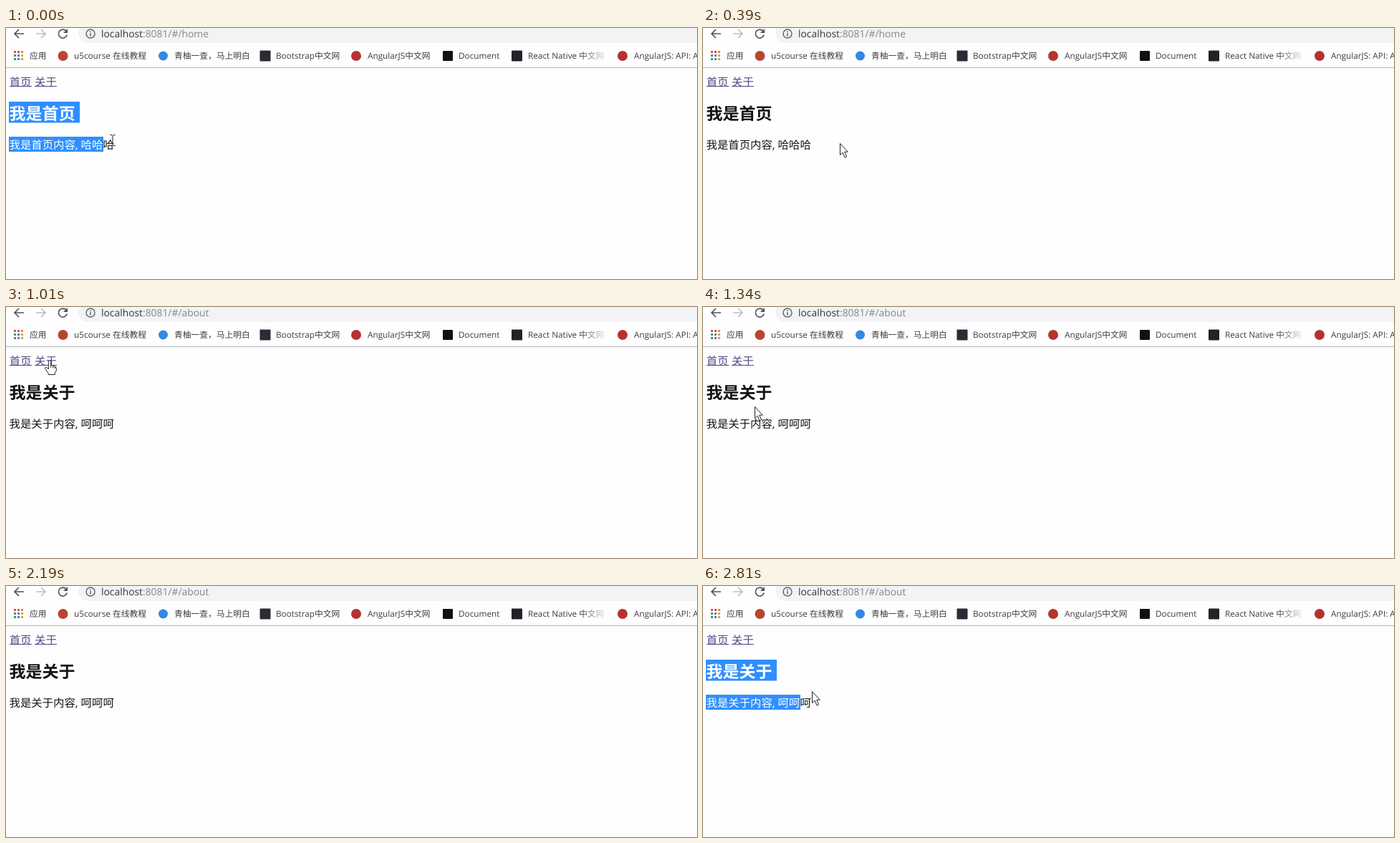
Write an HTML page that moves like this. It is 965 px wide and 351 px high and loops after 2.89 s.

```html
<!DOCTYPE html>
<html lang="zh-CN">
<head>
<meta charset="utf-8">
<title>Router demo</title>
<style>
  html, body { margin: 0; width: 100%; height: 100%; overflow: hidden; background: #fefefe; }
  svg { display: block; }
  text { font-family: "Open Sans", "Noto Sans CJK SC", sans-serif; text-rendering: geometricPrecision; }
  .url { font-size: 13.85px; fill: #84888c; }
  .marks text { font-size: 11.75px; fill: #3c3c40; }
  .link { font-size: 15.4px; fill: #504a86; }
  .title { font-size: 23px; font-weight: 700; }
  .body { font-size: 15.4px; }
  .cursor { display: none; }
</style>
</head>
<body>
<svg width="965" height="351" viewBox="0 0 965 351">
  <defs>
    <linearGradient id="fade" gradientUnits="userSpaceOnUse" x1="802" x2="838" y1="0" y2="0">
      <stop stop-color="#3c3c40"/>
      <stop offset="1" stop-color="#3c3c40" stop-opacity=".1"/>
    </linearGradient>
    <clipPath id="sel">
      <rect id="selTitle" x="4" y="103" height="29.5"/>
      <rect id="selBody" x="4" y="152" height="21"/>
    </clipPath>
  </defs>
  <rect width="965" height="351" fill="#fefefe"/>

  <!-- toolbar -->
  <rect x="101" y="-7" width="900" height="28" rx="14" fill="#f1f3f4"/>
  <g fill="none" stroke-width="1.7">
    <path d="M25 8H12.500M18 2L12 8L18 14" stroke="#505357"/>
    <path d="M42 8H54.500M49 2L55 8L49 14" stroke="#bcbec1"/>
    <path d="M84 4.200A6 6 0 1 0 85.200 9.500" stroke="#505357"/>
    <circle cx="118" cy="8" r="6" stroke="#5f6368" stroke-width="1.4"/>
    <path d="M118 7V11.500M118 4.500V6" stroke="#5f6368" stroke-width="1.5"/>
  </g>
  <path d="M86 1V7H80Z" fill="#505357"/>
  <text class="url" x="133" y="13"><tspan fill="#36393d">localhost</tspan>:8081/#/<tspan id="route"></tspan></text>

  <!-- bookmarks -->
  <g class="marks" id="marks"></g>
  <rect y="55" width="965" height="1" fill="#b4b4b6"/>

  <!-- page -->
  <text class="link" x="4.700" y="80.500">首页</text>
  <text class="link" x="40" y="80.500">关于</text>
  <path d="M5 81.500H36M40 81.500H71" stroke="#504a86"/>
  <g fill="#141414">
    <text class="title" x="4.500" y="128.200"></text>
    <text class="body" x="4.500" y="168.500"></text>
  </g>
  <g clip-path="url(#sel)" fill="#fff">
    <rect y="100" width="200" height="80" fill="#2f8fff"/>
    <text class="title" x="4.500" y="128.200"></text>
    <text class="body" x="4.500" y="168.500"></text>
  </g>

  <!-- pointers, each with its hot spot at 0,0 -->
  <path class="cursor" id="arrow" d="M.5.5V16.500L4.200 13.200L7 20L9.600 18.900L6.800 12.200H11.300Z" fill="#fff" stroke="#222"/>
  <path class="cursor" id="beam" d="M-3.500-7.500H-1L0-6.500L1-7.500H3.500M0-6.500V6.500M-3.500 7.500H-1L0 6.500L1 7.500H3.500" fill="none" stroke="#222"/>
  <g class="cursor" id="hand" stroke="#222" stroke-linejoin="round">
    <path d="M-1.700 12V1.200Q-1.500-.5 0-.5T1.700 1.200V6.500Q4.500 5.700 4.800 7.500Q7.200 7 7.400 8.700Q9.300 8.500 9.300 10.500V14L7.300 17V19.500H-2V17.500L-6.500 10.800Q-6.500 8.600-4.300 9.200Z" fill="#fff"/>
    <path d="M1.700 6.500V10M4.800 7.500V10.500M7.400 8.700V11" fill="none"/>
  </g>
</svg>
<script>
const LOOP = 2890;
const $ = id => document.getElementById(id);
const all = css => [...document.querySelectorAll(css)];

const pages = {
  home: ['我是首页', '我是首页内容, 哈哈哈'],
  about: ['我是关于', '我是关于内容, 呵呵呵']
};

// time, pointer, x, y, selected width of title, of body
const steps = [
  [0, 'beam', 149, 157, 99, 132],
  [70, 'beam', 149, 157, 99, 147],
  [250, 'arrow', 176, 183, 99, 147],
  [320, 'arrow', 190, 168],
  [390, 'arrow', 191, 161],
  [490, 'arrow', 152, 131],
  [570, 'arrow', 84, 88],
  [640, 'hand', 61, 75],
  [1020, 'hand', 60, 74],
  [1100, 'arrow', 62, 88],
  [1180, 'arrow', 66, 110],
  [1260, 'arrow', 70, 130],
  [1340, 'arrow', 72, 139],
  [1480, 'arrow', 70, 138],
  [1560, 'arrow', 58, 134],
  [1640, 'beam', 36, 124],
  [1720, 'none', 8, 118],
  [2100, 'beam', 9, 118],
  [2180, 'beam', 20, 120],
  [2260, 'beam', 42, 121],
  [2420, 'beam', 31, 122],
  [2570, 'beam', 30, 123],
  [2650, 'beam', 66, 122, 62],
  [2730, 'beam', 112, 150, 99, 101],
  [2810, 'arrow', 152, 147, 99, 132]
];
const ROUTE_CHANGE = 940;

// kind, icon centre, size, colour, label x, label
const bookmarks = [
  ['apps', 17.5, 0, '', 33, '应用'],
  ['dot', 79.5, 14, '#b8452f', 95, 'u5course 在线教程'],
  ['dot', 219.5, 13, '#3388e0', 235, '青柚一查，马上明白'],
  ['box', 362, 15, '#2c2a35', 377, 'Bootstrap中文网'],
  ['dot', 489, 14, '#b5322f', 505, 'AngularJS中文网'],
  ['box', 617, 14, '#111', 632, 'Document'],
  ['box', 713.5, 15, '#202328', 729, 'React Native 中文网'],
  ['dot', 861, 14, '#b5322f', 877, 'AngularJS: API: Angular']
];
const appColors = ['#dc5046', '#dc5046', '#e08a3c', '#3f9a62', '#4a80d0', '#e2a23a', '#3f9a62', '#4a80d0', '#e2a23a'];

const square = (cx, cy, size, fill, rx = 0) =>
  `<rect x="${cx - size / 2}" y="${cy - size / 2}" width="${size}" height="${size}" rx="${rx}" fill="${fill}"/>`;

function icon(kind, x, size, color) {
  if (kind === 'apps')
    return appColors.map((c, i) => square(x - 5 + i % 3 * 5, 33.5 + Math.floor(i / 3) * 5, 3, c)).join('');
  return square(x, 39, size, color, kind === 'dot' ? size / 2 : 1);
}

$('marks').innerHTML = bookmarks.map(([kind, cx, size, color, x, label]) =>
  icon(kind, cx, size, color) +
  `<text x="${x}" y="43.3"${label.startsWith('React') ? ' style="fill:url(#fade)"' : ''}>${label}</text>`
).join('');

function showPage(name) {
  if ($('route').textContent === name) return;
  $('route').textContent = name;
  const [title, body] = pages[name];
  all('.title').forEach(el => el.textContent = title);
  all('.body').forEach(el => el.textContent = body);
}

const pointers = all('.cursor');

function draw(t) {
  const [, kind, x, y, titleW = 0, bodyW = 0] = steps.findLast(s => s[0] <= t);
  showPage(t < ROUTE_CHANGE ? 'home' : 'about');
  $('selTitle').setAttribute('width', titleW);
  $('selBody').setAttribute('width', bodyW);
  for (const p of pointers) {
    p.style.display = p.id === kind ? 'inline' : 'none';
    p.setAttribute('transform', `translate(${x} ${y})`);
  }
}

const start = performance.now();
function tick() {
  draw((performance.now() - start) % LOOP);
  requestAnimationFrame(tick);
}
draw(0);
requestAnimationFrame(tick);
</script>
</body>
</html>
```
